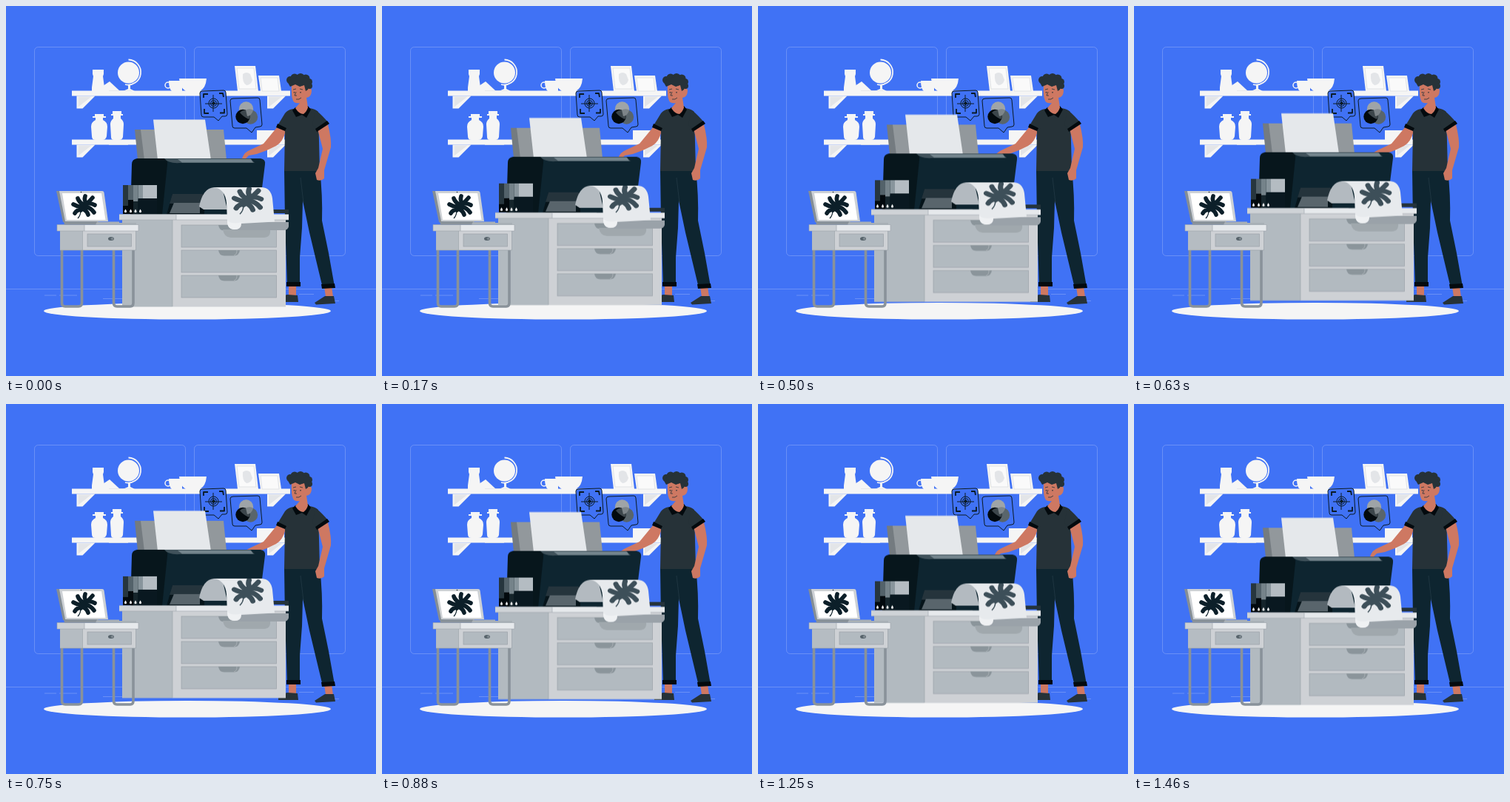
Recreate the animation shown at these times as an HTML page. Size 500x500 px, loop 1.5 s.

```html
<!DOCTYPE html>
<html lang="en">
<head>
<meta charset="utf-8">
<title>Print room</title>
<style>
  html, body { margin: 0; width: 100%; height: 100%; overflow: hidden; background: #4072f5; }
  svg { display: block; width: 100vw; height: 100vh; }
  .float { animation: float 1.5s linear -30ms infinite; }
  @keyframes float {
    0%, 100% { transform: translateY(.4px); }
    50% { transform: translateY(-9.6px); }
  }
  .line { fill: none; stroke: #86a5f8; stroke-width: .6; }
  .white { fill: #f5f5f5; }
  .shade { fill: #e3e5e8; }
  .ink { fill: none; stroke: #0a1a24; stroke-width: 1; stroke-linejoin: round; }
  .skin { fill: #ce7862; }
  .shirt { fill: #263238; }
  .navy { fill: #0e2530; }
  .black { fill: #030a0e; }
  .panel { fill: #b2bac0; stroke: #9aa2a8; stroke-width: .7; }
  .legs { fill: none; stroke: #89929a; stroke-width: 3.6; }
  .fingers { fill: none; stroke: currentColor; stroke-width: 5.6; stroke-linecap: round; stroke-linejoin: round; }
</style>
</head>
<body>
<svg viewBox="0 0 500 500">
  <defs>
    <g id="bracket">
      <path class="white" d="M0 0H25L8 17H0Z"/>
      <path class="shade" d="M2 1H20L2 15Z"/>
    </g>
    <g id="leaf">
      <path class="fingers" d="M-4 6L3-1L12-11M4-3Q0-7 2-13M1-1Q-6-4-8-10M-2 2Q-9 1-14-2M-3 5Q-9 5-12 10M5-3Q10-4 15-1M2 1Q9 2 14 9M-2 4Q4 6 6 12"/>
      <path d="M-4 6Q-4 13-8 17" fill="none" stroke="currentColor" stroke-width="1.200"/>
    </g>
    <path id="handle" fill="#8b959b" d="M0 0H29Q28 7.500 21 7.500H8Q1 7.500 0 0Z"/>
    <path id="drop" fill="#fff" d="M0-2.500Q3.200 2 0 2.200Q-3.200 2 0-2.500Z"/>
    <clipPath id="sheet"><path d="M290 245H348Q359 246 361 264L363 293H300Z"/></clipPath>
  </defs>

  <rect width="500" height="500" fill="#4072f5"/>
  <g class="line">
    <rect x="38.500" y="55.500" width="204" height="282" rx="5"/>
    <rect x="254.500" y="55.500" width="204" height="282" rx="5"/>
    <path d="M0 382.500H500M52 391H68M72 391H96M131 395.500H158M396 389.500H416M440 398.500H450"/>
  </g>

  <!-- shelves -->
  <g class="white">
    <path d="M89 114.500H384V121.500H89ZM89 180.500H378V187.500H89Z"/>
    <use href="#bracket" x="95.500" y="121.500"/><use href="#bracket" x="353" y="121.500"/>
    <use href="#bracket" x="95.500" y="187.500"/><use href="#bracket" x="353" y="187.500"/>
    <path d="M117 86H132V92L131 95L133 110V115H116V110L118 95L117 92Z"/>
    <path d="M129 115L131 108L140 102L154 115Z"/>
    <circle cx="165.500" cy="90" r="14.500"/>
    <path d="M165.500 72.500A17 17 0 1 1 161 106" fill="none" stroke="#f5f5f5" stroke-width="1.800"/>
    <path d="M165 106H168V112L174 115H158L165 112Z"/>
    <path d="M220 101H238V115H224Q220 112 220 101Z"/>
    <circle cx="219" cy="107" r="4" fill="none" stroke="#f5f5f5" stroke-width="1.500"/>
    <path d="M234 98H271Q270 111 262 115H243Q235 111 234 98Z"/>
    <path d="M309 81H337L341 115H313Z"/>
    <path d="M341 94H369L372 115H344Z"/>
    <path d="M339 168H376V181H339Z"/>
    <path d="M120 146H132V149H135V151H131V154Q137 157 137 163L136 176Q135 181 130 181H121Q116 181 116 176L115 163Q115 157 121 154V151H117V149H120Z"/>
    <path d="M144 142H156V146H158V148H155V152Q159 155 159 160L158 177Q157 181 153 181H146Q142 181 142 177L141 160Q141 155 145 152V148H142V146H144Z"/>
  </g>
  <path d="M312 84H335L338 112H315ZM344 97H367L369 115H346Z" fill="#fafafa" stroke="#d7dadd" stroke-width=".7"/>
  <path class="shade" d="M320 92Q325 88 330 92L333 100Q331 107 325 107Q319 104 320 92Z"/>
  <path d="M139 114.500H170M139 187.500H165" stroke="#e3e5e8" stroke-width=".8"/>

  <ellipse class="white" cx="245" cy="412.300" rx="194" ry="11.300"/>

  <!-- bubbles -->
  <g class="ink">
    <path fill="#4072f5" d="M265 115L294 114Q297 114 297 117L299 146Q299 149 296 149H292L287 155L281 150L267 150Q264 150 264 147L262 118Q262 115 265 115Z"/>
    <path fill="#4072f5" d="M307 125L340 124Q343 124 343 127L346 160Q346 163 343 163L337 164L332 171L325 165L309 165Q306 165 306 162L303 128Q303 125 307 125Z"/>
    <path stroke-width="1.800" d="M267 124V119H273M288 118H293L294 123M268 139V145H274M289 144.500H295V139"/>
    <circle cx="280.500" cy="131.500" r="6.500"/><circle cx="280.500" cy="131.500" r="4"/>
    <path d="M280 120V143M269 132H292"/>
    <circle cx="280.500" cy="131.500" r="1.800" fill="#0a1a24"/>
  </g>
  <circle cx="324.500" cy="139" r="9.700" fill="#9fa4a7"/>
  <circle cx="330.500" cy="150" r="9.700" fill="#59656b"/>
  <circle cx="320" cy="149.500" r="9.700" class="black"/>
  <path d="M316 144Q323 137 329 145Q331 149 328 153Q321 150 316 144Z" fill="#3c464b"/>
  <path d="M324 140.500Q331 138 334 141Q332 148 326 149Z" fill="#7d8589"/>

  <!-- person -->
  <g>
    <path class="skin" d="M367 163L378 169Q374 184 365 189Q352 196 339 200L328 202L323 207L319 206Q322 197 331 194L348 186Z"/>
    <path class="skin" d="M382 377H392L392 391H382ZM430 379H440L442 393H432Z"/>
    <path class="shirt" d="M368 394L380 390L394 391L395 400H368ZM417 401L431 392L443 392L445 402L419 403.500Z"/>
    <path class="navy" d="M376 221H424Q428 256 427 290L436 334L444 379L428 381L410 306L401 263L400 300L397 340L397 378L380 378L377 290Z"/>
    <path d="M398 232L402 266" fill="none" stroke="#263d48" stroke-width=".7"/>
    <path class="black" d="M379 373H398V379H379ZM426 376L444 375L445 381L427 382Z"/>
    <path class="shirt" d="M388 139L410 138Q418 139 422 143L424 223H376L377 168L366 163L377 145Q381 140 388 139Z"/>
    <path class="skin" d="M421 166L435 160Q440 180 439 191L430 222L430 233Q426 237 420 235L418 226L422 219L428 193Z"/>
    <path class="shirt" d="M418 141Q423 143 436 158L421 168L414 160Z"/>
    <path class="black" d="M367 159L379 165L377 169L365 164ZM418 166L434 155L437 159L420 170Z"/>
    <path class="black" d="M391 137L408 135L412 140L406 151L400 147L392 150L387 141Z"/>
    <path class="skin" d="M386 106Q385 122 388 128Q390 132 397 131L391 138Q396 146 402 146Q407 142 408 137L406 124Q413 123 413 114Q412 109 407 111L404 101H388Z"/>
    <g class="shirt">
      <circle cx="384" cy="100" r="5"/><circle cx="390" cy="97" r="5.500"/>
      <circle cx="398" cy="96.500" r="5.500"/><circle cx="405" cy="98" r="5.500"/>
      <circle cx="409.500" cy="102.500" r="4.500"/><circle cx="410" cy="108" r="4"/>
      <path d="M380 102L384 109L391 106L397 109L403 107L405 115L408 113L411 100L398 94Z"/>
    </g>
    <path d="M388 113L392 112M397 112L401 113M392 116L390 121H393M392 126Q396 127 399 124" fill="none" stroke="#263238" stroke-width=".8"/>
    <path d="M389.500 116V117.500M398 116V117.500" stroke="#263238" stroke-width="1.300"/>
  </g>

  <!-- printer and cabinet -->
  <g class="float">
    <path fill="#747b80" d="M174 167H184L189 208H178Z"/>
    <path fill="#92989c" d="M182 167H294L298 208H187Z"/>
    <path fill="#e5e8eb" d="M199 153.500H269L277 208H205Z"/>

    <path class="navy" d="M200 206H344Q351 207 350 214L346 246L343 282H200Z"/>
    <path fill="#07161c" d="M177 206H215Q219 208 218 214L211 282H168L170 214Q170 207 177 206Z"/>
    <path fill="#40525b" d="M214 206H330L336 212H235Q219 213 214 206Z"/>
    <path fill="#74858d" d="M232 207H331L334 211.500H238Z"/>
    <path fill="#06141a" d="M225 254H268V282H217Z"/>
    <path fill="#25343c" d="M225 254H266V267H221Z"/>
    <path fill="#59656c" d="M227 266H262V280H221Z"/>
    <path fill="#24333b" d="M340 275H382V280H340Z"/>

    <path fill="#b2bac0" d="M157 288H225V406.500H157Z"/>
    <path fill="#ced1d5" d="M225 288H378V406.500H225Z"/>
    <path d="M225 289V406" stroke="#9fa7ad" stroke-width=".7"/>
    <path fill="#cfd3d7" d="M153 281.500H230V289H153Z"/>
    <path fill="#e6e9ec" d="M230 281.500H382V289H230Z"/>
    <path d="M153 289H382M153 281.500H290M230 281.500V289" stroke="#9fa7ad" stroke-width=".6"/>
    <g class="panel">
      <rect x="237" y="296" width="128.500" height="30"/>
      <rect x="237" y="330" width="128.500" height="30"/>
      <rect x="237" y="364" width="128.500" height="30"/>
    </g>
    <use href="#handle" x="287" y="296"/>
    <use href="#handle" x="287" y="330"/>
    <use href="#handle" x="287" y="364"/>
    <path d="M308 337Q312 336 312 330M308 371Q312 370 312 364" fill="none" stroke="#a9b1b6"/>

    <path fill="#a0a8ad" d="M293 302H357Q358 313 348 313H304Q295 313 293 302Z"/>
    <path fill="#9aa2a9" d="M315 292H382V298Q381 303 375 303H310Z"/>
    <path fill="#b3bac0" d="M261 271Q266 246 281 245H292L299 275H267Z"/>
    <path fill="#e7eaed" d="M281 245H346Q358 246 360 260L363 291.500L318 294Q318 302 309 302Q299 302 299 291L298 266Q296 247 281 245Z"/>
    <path fill="#eff1f3" d="M299 290Q307 296 318 292Q318 302 309 302Q299 302 299 290Z"/>
    <g clip-path="url(#sheet)" color="#3d4f59">
      <use href="#leaf" transform="translate(326 262) scale(1.25 1.130)"/>
    </g>

    <path fill="#27363e" d="M158 242H165V281H158Z"/>
    <path fill="#53626a" d="M165 242H172V262H165Z"/>
    <path fill="#75838a" d="M172 242H178.500V264H172Z"/>
    <path fill="#88959c" d="M178.500 242H185V262H178.500Z"/>
    <path fill="#b4bcc2" d="M185 242H204V260H185Z"/>
    <path class="black" d="M165 262H172V281H165ZM158 270H165V281H158Z"/>
    <path fill="#15242b" d="M172 264H178.500V281H172Z"/>
    <path fill="#091820" d="M178.500 260H204V281H178.500Z"/>
    <use href="#drop" x="161.500" y="277"/><use href="#drop" x="168.500" y="277"/>
    <use href="#drop" x="175" y="277"/><use href="#drop" x="181.500" y="277"/>
  </g>

  <!-- desk and laptop -->
  <g class="legs">
    <path d="M75.500 329V401Q75.500 406 80 406H98Q102.500 406 102.500 401V329"/>
    <path d="M145.500 329V401Q145.500 406 150 406H168Q172 406 172 401V329"/>
  </g>
  <path fill="#b5bcc2" d="M73 303H103V330H73Z"/>
  <path fill="#ced1d5" d="M103 303H175.500V330H103Z"/>
  <path d="M73 330H175.500V304M103.500 304V330" fill="none" stroke="#9aa2a8" stroke-width=".7"/>
  <rect class="panel" x="110" y="308" width="59.500" height="17"/>
  <ellipse cx="142" cy="314.500" rx="4" ry="2.500" fill="#56626a"/>
  <circle cx="143.500" cy="314.500" r="1.800" fill="#7c878e"/>
  <path fill="#ccd0d4" d="M69 295.500H106V304H69Z"/>
  <path fill="#e6e9ec" d="M106 295.500H179V304H106Z"/>
  <path d="M69 304H179V295.500H69ZM106 295.500V304" fill="none" stroke="#9aa2a8" stroke-width=".6"/>
  <path fill="#89929a" d="M78 291H125L122 295.500H79Z"/>
  <path fill="#a8b0b6" d="M123 291.500H153V293H176V295.500H121Z"/>
  <path fill="#858e95" d="M68 250H75L83 292H77Z"/>
  <path fill="#cdd1d5" d="M72 250H130Q132 250 132.500 252L138 291H80Z"/>
  <path fill="#fff" d="M76 253H129L134.500 289H82Z"/>
  <circle cx="101.500" cy="251.500" r=".8" fill="#263238"/>
  <use href="#leaf" transform="translate(105 270)" color="#0c1f29"/>
</svg>
</body>
</html>
```
